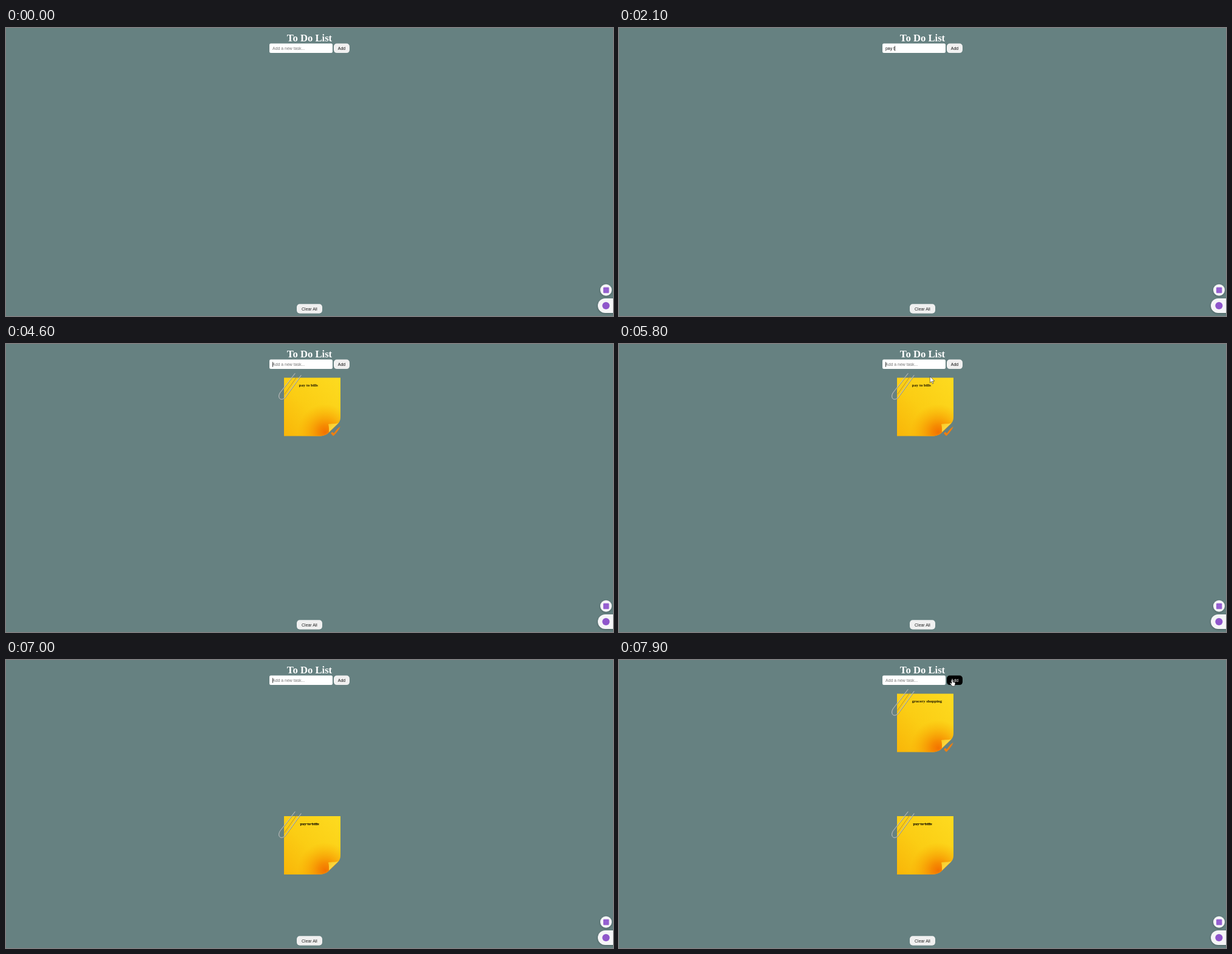
An HTML page that plays this animation: 1000 px wide and 474 px high, repeating every 8000 ms.

```html
<!DOCTYPE html>
<html lang="en">
<head>
<meta charset="utf-8">
<title>To Do List</title>
<style>
  html, body { margin: 0; width: 100%; height: 100%; overflow: hidden; background: #668181; }
  svg { display: block; width: 100%; height: 100%; }
  text { white-space: pre; }
  .ui { font: 6.94px "Liberation Sans", Arial, sans-serif; }
  .mid { text-anchor: middle; }
  .title { font: bold 16.67px "Liberation Serif", "Times New Roman", serif; fill: #fff; }
  .task { font: bold 6.7px "Liberation Serif", "Times New Roman", serif; fill: #1a1600; }
  .done { text-decoration: line-through; }
  .float { filter: drop-shadow(0 1px 1.5px rgba(30, 50, 50, .45)); }
  .pointer { fill: #fff; stroke: #222; stroke-width: .6; stroke-linejoin: round; }
</style>
</head>
<body>
<svg viewBox="0 0 1000 474" preserveAspectRatio="none">
  <defs>
    <linearGradient id="paper" x1="0" y1="1" x2="1" y2="0">
      <stop offset="0" stop-color="#f9b508"/>
      <stop offset=".45" stop-color="#fbcd14"/>
      <stop offset="1" stop-color="#fddb20"/>
    </linearGradient>
    <radialGradient id="glow" gradientUnits="userSpaceOnUse" cx="526" cy="145" r="46">
      <stop offset="0" stop-color="#f37200"/>
      <stop offset=".25" stop-color="#f58400" stop-opacity=".9"/>
      <stop offset="1" stop-color="#f9a800" stop-opacity="0"/>
    </radialGradient>
    <linearGradient id="fold" x1="0" y1="0" x2=".6" y2=".6">
      <stop offset="0" stop-color="#f9c51b"/>
      <stop offset="1" stop-color="#fbdc4a"/>
    </linearGradient>
    <path id="sheet" d="M458 55.6H551V119C551 126 549 129 546 132L532 145.5C528 149.5 523 151.6 515 151.6H458Z"/>
    <g id="note">
      <use href="#sheet" fill="url(#paper)"/>
      <use href="#sheet" fill="url(#glow)"/>
      <path d="M531 132C536 130.6 543 132 547.5 130L532 145C532.5 140 532 136 531 132Z" fill="url(#fold)"/>
      <g fill="none" stroke-width=".9" stroke-linecap="round">
        <path d="M479.5 53.5L459 82.5" stroke="#b98a2c"/>
        <path d="M476 48.5L451.5 80C448 85.500 449.500 91.500 454.500 91C457.500 90.600 459.500 88.500 461 86L486 51.500" stroke="#7f8583" transform="translate(.6 .5)"/>
        <path d="M476 48.5L451.5 80C448 85.500 449.500 91.500 454.500 91C457.500 90.600 459.500 88.500 461 86L486 51.500" stroke="#c9cbc9"/>
      </g>
    </g>
  </defs>

  <rect width="1000" height="474" fill="#668181"/>
  <text class="title mid" x="500" y="21.6">To Do List</text>

  <rect x="434" y="25.5" width="104" height="15.600" rx="2.300" fill="#fff"/>
  <text class="ui" id="field" x="439" y="36"></text>
  <rect id="caret" y="29.600" width=".8" height="8.200" fill="#111"/>

  <rect id="addBox" x="540" y="25.500" width="26" height="15.600" rx="5"/>
  <text class="ui mid" id="addText" x="553" y="36">Add</text>

  <rect x="479" y="454.200" width="42" height="15.600" rx="5" fill="#f0f0f0"/>
  <text class="ui mid" x="500" y="464.600" fill="#222">Clear All</text>

  <g id="open">
    <use href="#note"/>
    <path d="M535 146.500L538 144.800L540 147C543 143 546.500 138 550.800 135.700C549 141 543.500 147.500 539.500 151.300C537.800 150.300 536 148.500 535 146.500Z" fill="#ee7f12"/>
    <text class="task" id="openText" x="482.700" y="70.200"></text>
  </g>
  <g id="closed">
    <use href="#note" y="201.300"/>
    <text class="task done" x="484.500" y="271.500">pay to bills</text>
  </g>

  <g class="float">
    <circle cx="988.500" cy="431.300" r="9.500" fill="#f5f5f7"/>
    <path d="M1002 445H987A12 12 0 0 0 987 469H1002Z" fill="#f5f5f7"/>
  </g>
  <rect x="984" y="426.800" width="9.400" height="9.400" rx="1.200" fill="#9660d0"/>
  <circle cx="988.400" cy="457" r="6.100" fill="#8f56cb"/>

  <g id="mouse" class="pointer">
    <path id="arrow" d="M0 0V10.500L2.500 8.200L4.200 12L5.700 11.300L4.100 7.700H7.400Z"/>
    <path id="hand" d="M-1 1Q0 -.6 1 1V4.200L4.300 5Q5.200 5.400 5 6.800L4.200 9.300V11H-1V9.600L-3.700 6.600Q-4 5.200-2.700 5.500L-1 6.800Z"/>
  </g>
</svg>
<script>
const LOOP = 8000;
const HINT = 'Add a new task...';
const FIRST = 'pay to bills', SECOND = 'grocery shopping';
const KEYS = [1500, 1600, 1800, 2000, 2100, 2300, 2400, 2500, 2700, 2900, 3400, 3500];
const CARET = [[600, 1100], [1500, 4000], [4600, 5100], [5700, 6200], [7000, 7600]];
const ADDED = 4100, CHECKED = 6600, PASTED = 7300, ADDED_2 = 7900;
// time, x, y of the pointer's tip
const PATH = [
  [5600, 505, 36], [5900, 516, 62], [6200, 535, 125], [6400, 541, 144], [6600, 541, 144],
  [6800, 522, 85], [7000, 500, 36], [7400, 505, 36], [7700, 549, 32], [8000, 549, 32]
];

const $ = id => document.getElementById(id);
const show = (id, on) => $(id).setAttribute('visibility', on ? 'visible' : 'hidden');

function typed(t) {
  if (t < ADDED) return FIRST.slice(0, KEYS.filter(k => k <= t).length);
  return t >= PASTED && t < ADDED_2 ? SECOND : '';
}

function pointerAt(t) {
  const i = PATH.findIndex(p => p[0] > t);
  if (i < 1) return null;
  const [t0, x0, y0] = PATH[i - 1], [t1, x1, y1] = PATH[i];
  const k = (t - t0) / (t1 - t0);
  return [x0 + (x1 - x0) * k, y0 + (y1 - y0) * k];
}

function drawField(t) {
  const value = typed(t), field = $('field');
  field.textContent = value || HINT;
  field.setAttribute('fill', value ? '#111' : '#757575');
  $('caret').setAttribute('x', 439 + (value ? field.getComputedTextLength() : 0));
  show('caret', CARET.some(([on, off]) => t >= on && t < off));
}

function drawNotes(t) {
  show('open', t >= ADDED && t < CHECKED || t >= ADDED_2);
  show('closed', t >= CHECKED);
  $('openText').textContent = t < CHECKED ? FIRST : SECOND;
}

function drawPointer(t) {
  const tip = pointerAt(t);
  const [x, y] = tip || [0, 0];
  const overField = y < 41 && x < 538;
  const overAdd = !!tip && y < 41 && x >= 540;
  const overCheck = t < CHECKED && y > 136;
  const visible = tip && !overField;
  $('mouse').setAttribute('transform', `translate(${x} ${y})`);
  show('hand', visible && (overAdd || overCheck));
  show('arrow', visible && !overAdd && !overCheck);
  $('addBox').setAttribute('fill', overAdd ? '#000' : '#f0f0f0');
  $('addText').setAttribute('fill', overAdd ? '#fff' : '#111');
}

function frame() {
  const t = Math.floor(performance.now() % LOOP / 100) * 100;
  drawField(t);
  drawNotes(t);
  drawPointer(t);
  requestAnimationFrame(frame);
}
frame();
</script>
</body>
</html>
```
